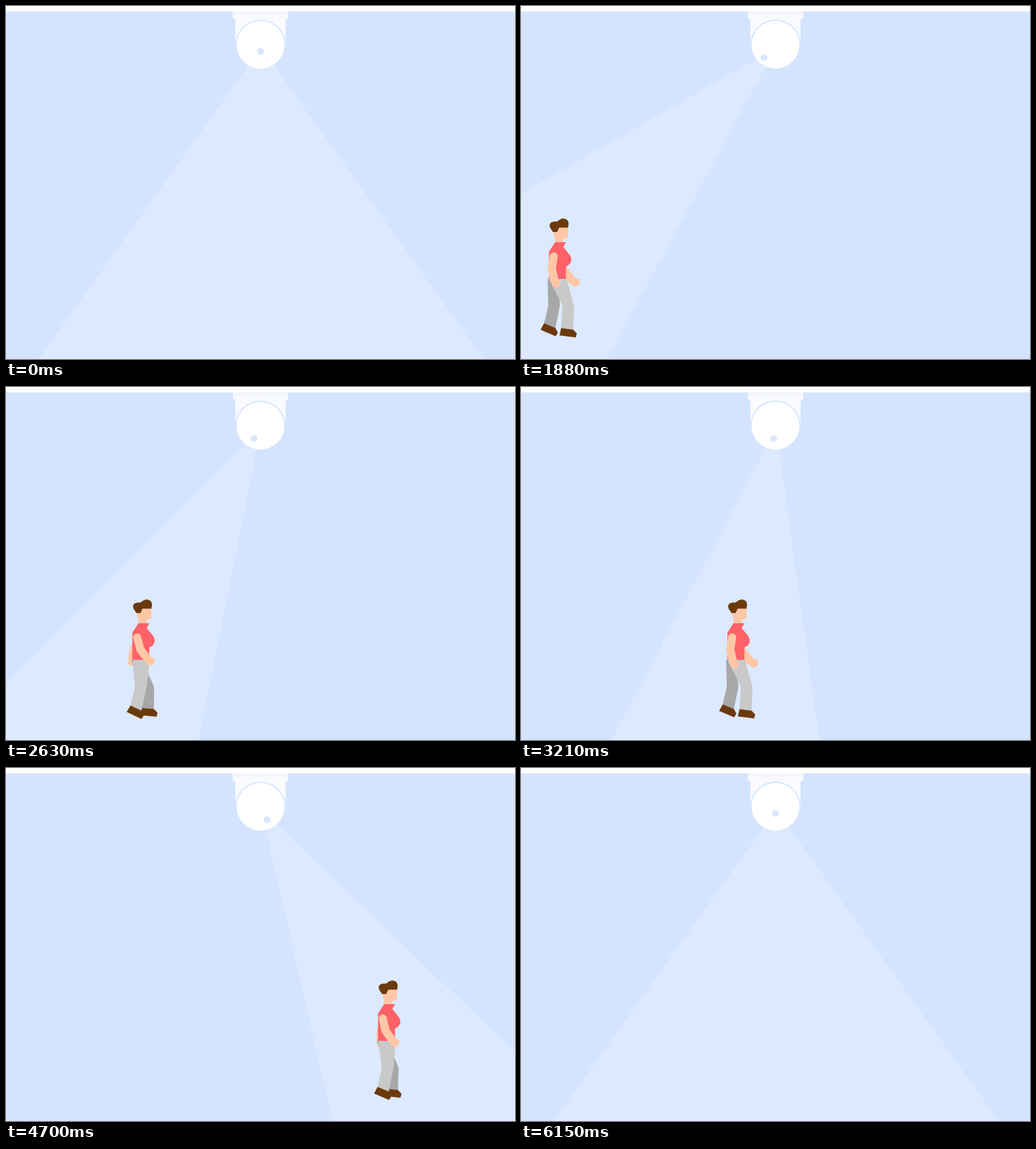
An HTML page that plays this animation: 750x520 px, repeating every 6640 ms.

```html
<!DOCTYPE html>
<html lang="en">
<head>
<meta charset="utf-8">
<title>Tracking camera</title>
<style>
  html, body { margin: 0; width: 100%; height: 100%; overflow: hidden; background: #fff; }
  svg { display: block; width: 750px; height: 520px; }
  .skin { fill: #ffc7a6; }
  .arm polyline { fill: none; stroke: #ffc7a6; stroke-width: 12; stroke-linecap: round; stroke-linejoin: round; }
  .shirt { fill: #ff6168; }
  .brown { fill: #6b3a0c; }
  .near { fill: #c9c9c9; }
  .far { fill: #a7a7a7; }
</style>
</head>
<body>
<svg viewBox="0 0 750 520">
  <defs>
    <linearGradient id="plate" x2="0" y2="1">
      <stop offset="0" stop-color="#f0f4fc"/>
      <stop offset=".6" stop-color="#f9fafe"/>
    </linearGradient>
    <path id="shoe" class="brown" d="M-9 0H9L15 5L14 11H-10Z"/>
    <path id="hand" class="skin" d="M-5 0H5L10 5L5 12L-3 11Z"/>
  </defs>
  <rect width="750" height="520" fill="#fff"/>
  <rect y="8" width="750" height="512" fill="#d4e4ff"/>

  <path d="M338 18H412V57H338Z" fill="#fafaff"/>
  <circle cx="375" cy="57" r="37" fill="#d4e4ff"/>
  <path d="M334 8H416V15Q416 20 411 20H339Q334 20 334 15Z" fill="url(#plate)"/>
  <polygon id="beam" fill="#dce9fe"/>
  <circle cx="375" cy="57" r="35.3" fill="#fff"/>
  <circle id="lens" r="5" fill="#d9e7ff"/>

  <g id="walker">
    <g id="farArm" class="arm"><polyline/><use href="#hand"/></g>
    <g id="farLeg"><polygon class="far"/><use href="#shoe"/></g>
    <g id="nearLeg"><polygon class="near"/><use href="#shoe"/></g>
    <path class="skin" d="M5 322H27V340Q27 342 24 342L20 343V350H8V343L5 332Z"/>
    <path class="shirt" d="M8 348H24L20 355L29 366Q34.500 373 30 379.500Q27.500 383 24 383.500V402H-1V362Z"/>
    <path class="brown" d="M5 333L1 327Q-1 323 1 320Q3 317.500 7 317.500H11L15 314.500Q20 311.500 25 314.500Q28 317 28 321L27 326.500H14L11 333Z"/>
    <g id="nearArm" class="arm"><polyline/><use href="#hand"/></g>
  </g>
</svg>
<script>
const LOOP = 6640, STRIDE = 1000;
const APEX = { x: 376, y: 61 };
const $ = id => document.getElementById(id);
const mix = (a, b, k) => a + (b - a) * k;
const easeOut = k => 1 - (1 - Math.min(Math.max(k, 0), 1)) ** 2;
const rad = deg => deg * Math.PI / 180;

// time and place of the walker
const WALK = [[1050, -120], [1880, 42], [2630, 187], [3210, 305], [3950, 428], [4700, 549], [5850, 775]];

function walkerX(t) {
  const i = Math.max(1, WALK.findIndex(([time]) => time > t));
  if (t >= WALK.at(-1)[0]) return 900;
  const [[t0, x0], [t1, x1]] = [WALK[i - 1], WALK[i]];
  return mix(x0, x1, (t - t0) / (t1 - t0));
}

function ray(deg) {
  const reach = 1400;
  return `${APEX.x - reach * Math.sin(rad(deg))},${APEX.y + reach * Math.cos(rad(deg))}`;
}

// The camera rests on a wide view and, while tracking, aims a narrow beam at the walker.
function drawCamera(t, x) {
  const track = easeOut((t - 1050) / 350) * (1 - easeOut((t - 5750) / 400));
  const offset = x + 13 - APEX.x;
  const aim = -Math.atan(offset / 328) * 180 / Math.PI;
  const center = mix(0, aim, track);
  const half = mix(35.55, 18.5 - 0.06 * Math.abs(aim), track);
  $("beam").setAttribute("points", `${APEX.x},${APEX.y} ${ray(center + half)} ${ray(center - half)}`);
  $("lens").setAttribute("cx", 375 + 0.053 * offset * track);
  $("lens").setAttribute("cy", mix(67, 76, track));
}

function setLimb(id, points, end, angle) {
  const [shape, tip] = $(id).children;
  shape.setAttribute("points", points.join(" "));
  tip.setAttribute("transform", `translate(${end}) rotate(${angle})`);
}

// swing runs from -1 (back) to 1 (forward)
function drawLeg(id, swing, hip, hipHalf, floor) {
  const knee = hip + 8.5 + 9 * swing;
  const ankle = [hip + 4.5 + 12 * swing, floor + 1.5 * swing];
  const tilt = 15 - 10 * swing;
  const dx = 9 * Math.cos(rad(tilt)), dy = 9 * Math.sin(rad(tilt));
  setLimb(id, [
    hip - hipHalf, 402, knee - 8.5, 442,
    ankle[0] - dx, ankle[1] - dy, ankle[0] + dx, ankle[1] + dy,
    knee + 8.5, 442, hip + hipHalf, 402
  ], ankle, tilt);
}

function drawArm(id, swing, shoulder, reach, drop) {
  const elbow = [shoulder + 0.5 + 0.55 * reach * swing, 387];
  const wrist = [shoulder + 7 + reach * swing, 401.5 + drop * swing];
  setLimb(id, [shoulder, 369, ...elbow, ...wrist], wrist, -14 - 1.6 * reach * swing);
}

function drawWalker(t, x) {
  $("walker").setAttribute("transform", `translate(${x})`);
  const swing = Math.tanh(1.6 * Math.cos((t - 2045) / STRIDE * 2 * Math.PI)) / 0.87;
  drawLeg("nearLeg", swing, 12, 13, 474.5);
  drawLeg("farLeg", -swing, 5, 8, 472);
  drawArm("nearArm", -swing, 6, 8, -1.5);
  drawArm("farArm", swing, 11, 19, 3);
}

const start = performance.now();
(function tick() {
  const t = (performance.now() - start) % LOOP;
  const x = walkerX(t);
  drawCamera(t, x);
  drawWalker(t, x);
  requestAnimationFrame(tick);
})();
</script>
</body>
</html>
```
